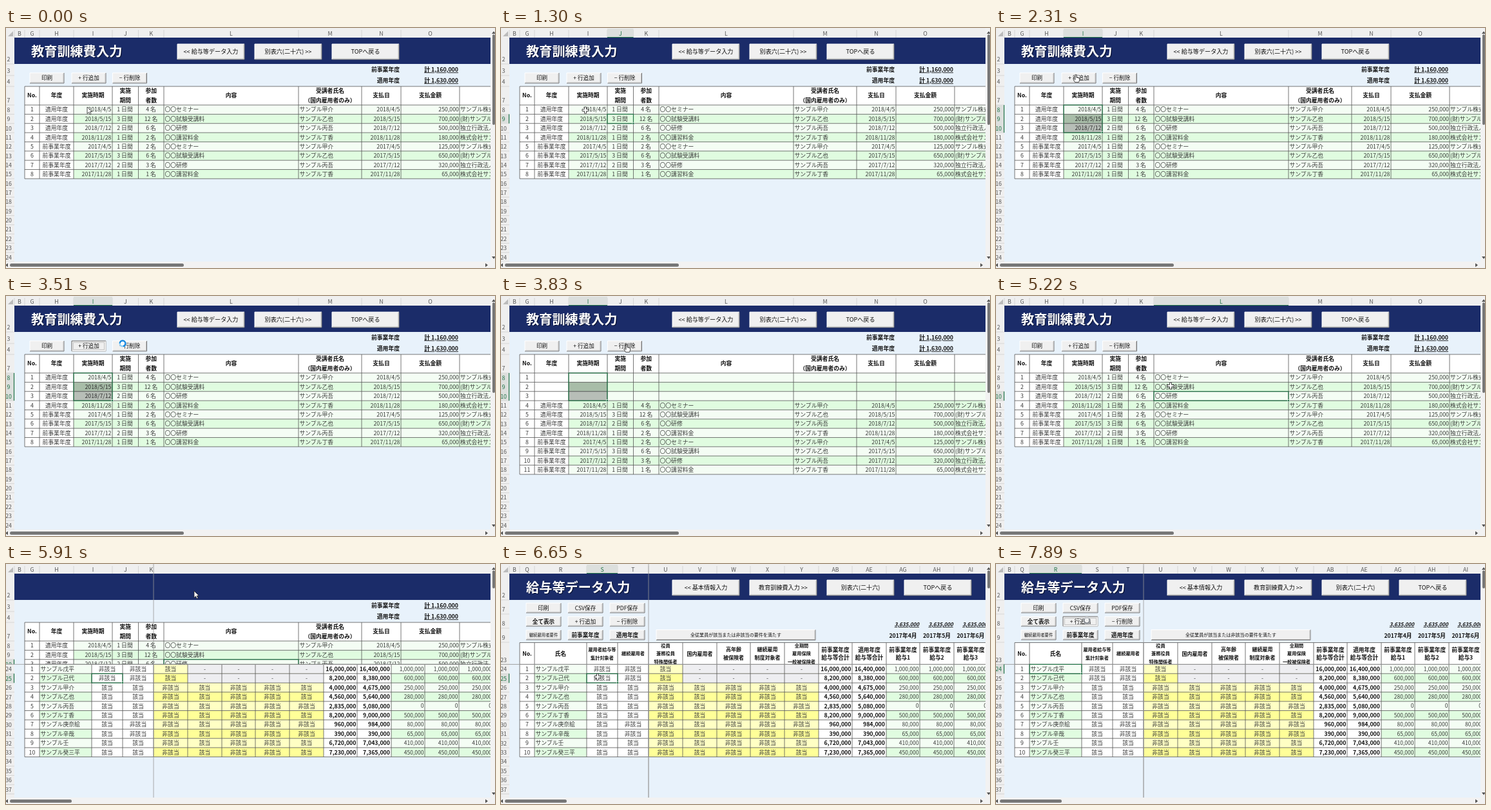
An HTML page for the animation above (8 s loop, 759 by 374 pixels).

```html
<!DOCTYPE html>
<html lang="ja">
<head>
<meta charset="utf-8">
<title>教育訓練費入力</title>
<style>
html, body { margin: 0; width: 100%; height: 100%; overflow: hidden; background: #e8f2fb; }
svg { display: block; width: 759px; height: 374px; font-family: "Noto Sans CJK JP", "Noto Sans CJK", sans-serif; }
text { white-space: pre; }
</style>
</head>
<body>
<svg id="stage" viewBox="0 0 759 374" xmlns="http://www.w3.org/2000/svg"></svg>
<script>
const LOOP = 8000;
const NAVY = '#1b2c69', BG = '#e8f2fb', HEAD = '#efefef', LINE = '#555', GREEN = '#217346';
const MINT = ['#f4fdf4', '#e0fce0'], LEMON = ['#ffffc4', '#ffff98'];

// drawing helpers
const text = (x, y, s, o = {}) => {
  const { size = 8.8, at = 'middle', bold, fill = '#3a3a3a', more = '' } = o;
  return `<text x="${x}" y="${y + size * 0.37}" font-size="${size}" text-anchor="${at}" fill="${fill}" font-weight="${bold ? 700 : 400}" ${more}>${s}</text>`;
};
const rect = (x, y, w, h, fill, more = '') => `<rect x="${x}" y="${y}" width="${w}" height="${h}" fill="${fill}" ${more}/>`;
const path = (d, stroke = LINE, width = 0.8, more = '') => `<path d="${d}" fill="none" stroke="${stroke}" stroke-width="${width}" ${more}/>`;
const group = (s, ...spans) => `<g ${spans.length ? `data-on="${spans.join(' ')}"` : ''}>${s}</g>`;
const left = { at: 'start' }, right = { at: 'end' }, bold = { bold: true, fill: '#111' };
const mid = (cols, i) => (cols[i] + cols[i + 1]) / 2;
const range = (a, b) => Array.from({ length: b - a + 1 }, (_, i) => a + i);

function button(x, y, w, h, label, o = {}) {
  const { size = 8.6, down } = o;
  const lit = down ? '#666' : '#fff', dark = down ? '#ddd' : '#777';
  return rect(x, y, w, h, '#f0f0f0') +
    path(`M${x} ${y + h}V${y}H${x + w}`, lit, 1) +
    path(`M${x} ${y + h}H${x + w}V${y}`, dark, 1) +
    path(`M${x + 1} ${y + h - 1}H${x + w - 1}V${y + 1}`, down ? '#eee' : '#b4b4b4', 0.8) +
    (down ? rect(x + 2.5, y + 2.5, w - 5, h - 5, 'none', 'stroke="#777" stroke-width=".7" stroke-dasharray="1 1"') : '') +
    text(x + w / 2, y + h / 2, label, { size, fill: '#111', bold: o.bold });
}
const title = s => {
  const o = { size: 20.2, at: 'start', bold: true };
  return text(40.3, 37.5, s, { ...o, fill: '#0c1538' }) + text(39, 36.2, s, { ...o, fill: '#fff' });
};
const nav = labels => labels.map((s, i) => button(266 + 120 * i, 25, 104, 24, s, { size: 9.1 })).join('');

// sheet geometry
const colsA = [13, 29, 52, 105, 165, 205.5, 245, 454, 552, 613, 704, 765];
const colsB = [13, 29, 52, 133, 181, 229, 282, 335, 387, 440, 493, 545, 598, 650, 703, 755];
const lettersA = 'B G H I J K L M N O'.split(' ');
const lettersB = 'B Q R S T U V W X Y AB AE AG AH AI'.split(' ');
const rowA = n => 120 + 14.36 * (n - 8);
const rowB = n => 156.4 + 14.42 * (n - 24);
const endA = n => ({ 2: 56, 3: 74, 4: 91, 7: 120 })[n] || rowA(n + 1);
const endB = n => ({ 2: 56, 7: 78, 8: 100, 9: 122, 23: 156.4 })[n] || rowB(n + 1);

const colHead = (cols, letters) => rect(0, 0, 752, 15, HEAD) + '<path d="M11 5V13H3Z" fill="#bbb"/>' +
  letters.map((s, i) => path(`M${cols[i]} 3V15`, '#d0d0d0') + text(mid(cols, i), 8.5, s, { fill: '#555' })).join('');
const rowHead = (rows, end) => rows.map(n => path(`M0 ${end(n)}H13`, '#d0d0d0') +
  text(4, end(n) - 6.8, n, { fill: '#555' })).join('');
const scrollbars = (w, h) => rect(752, 0, 7, 374, '#f2f2f2') + rect(0, 364, 759, 10, '#f2f2f2') +
  rect(755, 10, 4, h, '#777', 'rx="2"') + rect(6, 367, w, 5, '#777', 'rx="2.5"') +
  '<path d="M754 9L757 5 760 9ZM754 356L757 360 760 356ZM3 366.500V372.500L-1 369.500ZM744 366.500V372.500L748 369.500Z" fill="#555"/>';
const grid = (cols, top, y0, n, step) => {
  let d = cols.slice(1).map(x => `M${x} ${top}V${y0 + n * step}`).join('') + `M29 ${top}H752`;
  for (let i = 0; i <= n; i++) d += `M29 ${y0 + i * step}H752`;
  return path(d);
};

// training sheet
const people = ['甲介', '乙也', '丙吾', '丁香'].map(s => 'サンプル' + s);
const lessons = ['セミナー', '試験受講料', '研修', '講習料金'];
const payees = ['サンプル株式会社', '(財)サンプル協会', '独立行政法人見本', '株式会社サンプル'];
const days = ['4/5', '5/15', '7/12', '11/28'], spans = [1, 3, 2, 1];
const heads = [4, 12, 6, 2, 2, 6, 3, 1], fees = [250, 700, 500, 180, 125, 650, 320, 65];

function tableA(n, yearOf, dataOf) {
  let s = rect(29, 120, 76, n * 14.36, '#fff');
  for (let i = 0; i < n; i++) {
    const top = rowA(8 + i), y = top + 7.2, yi = yearOf(i), k = dataOf(i), q = k % 4;
    s += rect(105, top, 650, 14.36, MINT[i % 2]) + text(40.5, y, i + 1);
    if (yi >= 0) s += text(78.5, y, yi < 4 ? '適用年度' : '前事業年度');
    if (k < 0) continue;
    const date = (k < 4 ? 2018 : 2017) + '/' + days[q];
    s += text(163.5, y, date, right) + text(184.5, y, spans[q] + ' 日間') + text(225, y, heads[k] + ' 名') +
      text(246.5, y, '〇〇' + lessons[q], left) + text(455.5, y, people[q], left) +
      text(611.5, y, date, right) + text(703, y, fees[k] + ',000', right) + text(705, y, payees[q], left);
  }
  return s + grid(colsA, 91, 120, n, 14.36);
}

const headA = [['No.'], ['年度'], ['実施時期'], ['実施', '期間'], ['参加', '者数'], ['内容'],
  ['受講者氏名', '（国内雇用者のみ）'], ['支払日'], ['支払金額']];
const header = (cols, list, y, gap, sizes) => list.map((lines, i) => lines.map((s, j) =>
  text(mid(cols, i + 1), y + (j - (lines.length - 1) / 2) * gap, s, { ...bold, size: sizes ? sizes(i) : 8.8 })).join('')).join('');
const total = (y, name, sum) => text(611, y, name, { ...bold, ...right }) +
  text(702, y, '計 ' + sum, { ...bold, ...right, more: 'text-decoration="underline"' });
const shift = i => i < 3 ? -1 : i - 3;
const same = i => i;

const add = down => button(102, 70, 53, 16, '+ 行追加', { down });
const del = down => button(165.5, 70, 53, 16, '− 行削除', { down });

// selection with highlighted headings
function select(cols, letters, rowTop, c, r0, r1, a, b, colFrom = a) {
  const x = cols[c], w = cols[c + 1] - x, y = rowTop(r0), h = rowTop(r1 + 1) - y;
  const col = rect(x, 1, w, 14, '#dcdfdd') + path(`M${x} 14.500H${x + w}`, GREEN, 1.2) + text(x + w / 2, 8.5, letters[c], { fill: GREEN });
  let s = rect(0, y, 13, h, '#dcdfdd') + path(`M12.500 ${y}V${y + h}`, GREEN, 1.2);
  for (const n of range(r0, r1)) s += text(4, rowTop(n + 1) - 6.8, n, { fill: GREEN });
  if (r1 > r0) s += rect(x, rowTop(r0 + 1), w, rowTop(r1 + 1) - rowTop(r0 + 1), '#000', 'opacity=".25"');
  s += rect(x, y, w, h, 'none', `stroke="${GREEN}" stroke-width="1.2"`) +
    rect(x + w - 1.5, y + h - 1.5, 3, 3, GREEN, 'stroke="#fff" stroke-width=".6"');
  return group(col, colFrom, b) + group(s, a, b);
}
const selA = (...a) => select(colsA, lettersA, rowA, ...a);
const selB = (...a) => select(colsB, lettersB, rowB, ...a);

const sheetA = rect(0, 0, 759, 374, BG) + rect(13, 15, 739, 41, NAVY) + rect(0, 0, 13, 374, HEAD) +
  colHead(colsA, lettersA) + rowHead([2, 3, 4, ...range(7, 24)], endA) +
  total(65, '前事業年度', '1,160,000') + total(82, '適用年度', '1,630,000') +
  rect(29, 91, 723, 29, '#fff') + header(colsA, headA, 105, 14.5) +
  group(tableA(8, same, same), 0, 3640, 4560, LOOP) +
  group(tableA(11, shift, shift), 3640, 4440) +
  group(tableA(11, shift, i => i < 8 ? i : i - 3), 4440, 4560) +
  selA(4, 9, 9, 560, 1640) + selA(3, 8, 8, 1640, 1760) + selA(3, 8, 9, 1760, 1850) +
  selA(3, 8, 10, 1850, 5090) + selA(6, 10, 10, 5090, 5980) + scrollbars(270, 141) +
  group(title('教育訓練費入力') + nav(['&lt;&lt; 給与等データ入力', '別表六(二十六) &gt;&gt;', 'TOPへ戻る']) +
    button(37, 70, 53, 16, '印刷') + add() + del() +
    group(add(true), 3000, 3640) + group(del(true), 4160, 4400), 0, 5780);

// payroll sheet
const staff = [
  ['戊平', '非非該----', '16,000', '16,400', '1,000'], ['己代', '非非該----', '8,200', '8,380', '600'],
  ['甲介', '該該非該非非該', '4,000', '4,675', '250'], ['乙也', '該該非該非非該', '4,560', '5,640', '280'],
  ['丙吾', '該該非該非非非', '2,835', '5,080', ''], ['丁香', '該該非該非非該', '8,200', '9,000', '500'],
  ['庚奈絵', '該非非該非非非', '960', '984', '80'], ['辛哉', '該非非該非非非', '390', '390', '65'],
  ['壬', '該該非該非非該', '6,720', '7,043', '410'], ['癸三平', '該該非該非非該', '7,230', '7,365', '450']];
const words = { 非: '非該当', 該: '該当', '-': '-' };

function tableB() {
  let s = rect(29, 156.4, 723, 144.2, '#fff');
  staff.forEach(([name, flags, last, now, pay], i) => {
    const top = rowB(24 + i), y = top + 7.2, fill = (a, b, c) => rect(colsB[a], top, colsB[b] - colsB[a], 14.42, c);
    s += fill(2, 3, MINT[i % 2]) + fill(5, 10, LEMON[i % 2]) + fill(12, 15, MINT[i % 2]);
    if (i < 2) s += fill(6, 10, '#eeeef1');
    s += text(40.5, y, i + 1) + text(53.5, y, 'サンプル' + name, left);
    [...flags].forEach((f, j) => { s += text(mid(colsB, j + 3), y, words[f]); });
    s += text(543.5, y, last + ',000', { ...bold, ...right }) + text(596, y, now + ',000', { ...bold, ...right });
    for (const x of [648.5, 701.5, 754]) s += text(x, y, pay ? pay + ',000' : '0', { ...right, size: 8.5 });
  });
  return s + grid(colsB, 156.4, 156.4, 10, 14.42);
}

const headB = [['No.'], ['氏名'], ['雇用者給与等', '集計対象者'], ['継続雇用者'], ['役員', '兼務役員', '特殊関係者'], ['国内雇用者'],
  ['高年齢', '被保険者'], ['継続雇用', '制度対象者'], ['全期間', '雇用保険', '一般被保険者'],
  ['前事業年度', '給与等合計'], ['適用年度', '給与等合計'], ...[1, 2, 3].map(n => ['前事業年度', '給与' + n])];
const sizeB = i => i < 2 || i > 8 ? 8.7 : i < 5 || i === 8 ? 7.2 : 8;
const toolsB = [['印刷', 'CSV保存', 'PDF保存'], ['全て表示', '+ 行追加', '− 行削除'], ['継続雇用者要件', '前事業年度', '適用年度']];
const strong = ['全て表示', '前事業年度', '適用年度'];
const toolB = (r, c, down) => {
  const s = toolsB[r][c];
  return button(39 + 65 * c, 61 + 21 * r, 54, 15, s, { down, bold: strong.includes(s), size: s.length > 6 ? 6.4 : 8.6 });
};

const lowerB = rect(0, 156.4, 752, 208, BG) + rect(0, 156.4, 13, 208, HEAD) + rowHead(range(24, 37), endB) +
  tableB() + rect(229, 0, 523, 15, HEAD) + path('M229 0V364M0 156.400H752', '#999') + scrollbars(96, 28);

const upperB = rect(0, 0, 752, 156.4, BG) + rect(13, 15, 739, 41, NAVY) + rect(0, 0, 13, 156.4, HEAD) +
  colHead(colsB, lettersB) + rowHead([2, 7, 8, 9, 23], endB) + title('給与等データ入力') +
  nav(['&lt;&lt; 基本情報入力', '教育訓練費入力 &gt;&gt;', '別表六(二十六)', 'TOPへ戻る']) +
  toolsB.map((row, r) => row.map((_, c) => toolB(r, c)).join('')).join('') + group(toolB(1, 1, true), 7700, LOOP) +
  button(241, 102.5, 247, 16, '全従業員が該当または非該当の要件を満たす', { size: 7.05 }) +
  [4, 5, 6].map((m, i) => text(649 + 52.7 * i, 94, '3,635,000', { ...bold, ...right, size: 8, more: 'font-style="italic" text-decoration="underline"' }) +
    text(mid(colsB, 12 + i), 112, `2017年${m}月`, { ...bold, size: 8.7 })).join('') +
  rect(29, 122.5, 723, 34, '#fff') + header(colsB, headB, 139.8, 12.6, sizeB) +
  path(colsB.slice(1).map(x => `M${x} 122.500V156.400`).join('') + 'M29 122.500H752M29 156.400H752') +
  path('M229 0V364M0 156.400H752', '#999') + rect(752, 0, 7, 374, '#f2f2f2') + scrollbars(96, 28);

// pointer shapes, hot spot at the origin
const ring = (a, b) => `<circle r="5.800" fill="#fff" opacity=".85"/><circle r="4.400" fill="none" stroke="${b}" stroke-width="2.200"/>` +
  `<circle class="spin" r="4.400" fill="none" stroke="${a}" stroke-width="2.200" stroke-dasharray="19 9"/>`;
const inked = d => path(d, '#222', 0.8, 'style="fill:#fff" stroke-linejoin="round"');
const pointers = {
  arrow: inked('M0 0V10.500L2.500 8.200 4.200 12 6 11.200 4.300 7.500H7.500Z'),
  cross: inked('M-1.500 -5H1.500V-1.500H5V1.500H1.500V5H-1.500V1.500H-5V-1.500H-1.500Z'),
  hand: inked('M-1 0Q0 -1 1 0V4L5 5Q6 5.500 5.700 8L4.500 11.500H-1.500L-4 7Q-4 5.500 -2.500 6.300L-1 7.500Z'),
  ring: ring('#1788e0', '#8fd0f7'),
  dim: ring('#8c9096', '#c6c9cc')
};

document.getElementById('stage').innerHTML = sheetA + group(lowerB, 5840, LOOP) + group(upperB, 5980, LOOP) +
  selB(3, 25, 25, 5840, 6860, 5980) + selB(2, 24, 24, 6860, LOOP) +
  '<g id="pointer">' + Object.entries(pointers).map(([k, s]) => `<g data-kind="${k}">${s}</g>`).join('') + '</g>';

// time, x, y, shape
const track = [
  [0, 126, 123, 'arrow'], [330, 126, 123, 'cross'], [560, 184, 141, 'cross'], [650, 184, 141, 'cross'],
  [850, 116, 129, 'cross'], [1000, 116, 129, 'cross'], [1300, 131, 128, 'cross'], [1570, 131, 128, 'cross'],
  [1640, 135, 128, 'cross'], [1900, 135, 156, 'cross'], [1980, 135, 156, 'cross'], [2310, 124, 73, 'hand'],
  [2380, 124, 73, 'hand'], [2800, 129, 74, 'hand'], [3210, 129, 74, 'ring'], [3510, 181, 74, 'ring'],
  [3700, 193, 75, 'hand'], [3830, 195, 76, 'hand'], [4600, 195, 76, 'hand'], [4660, 205, 90, 'cross'],
  [4890, 270, 155, 'cross'], [5090, 270, 155, 'cross'], [5220, 271, 140, 'cross'], [5560, 292, 52, 'hand'],
  [5640, 292, 42, 'hand'], [5780, 292, 42, 'arrow'], [6050, 292, 42, 'cross'], [6650, 150, 176, 'cross'],
  [6720, 150, 176, 'cross'], [6860, 104, 164, 'cross'], [7050, 104, 164, 'cross'], [7470, 128, 86, 'hand'],
  [7540, 128, 86, 'hand'], [7760, 141, 88, 'dim'], [LOOP, 141, 88, 'dim']];

const timed = [...document.querySelectorAll('[data-on]')].map(el => [el, el.dataset.on.split(' ').map(Number)]);
const pointer = document.getElementById('pointer');
const shapes = [...pointer.children], spinners = [...document.querySelectorAll('.spin')];
const show = (el, on) => { el.style.display = on ? '' : 'none'; };

function draw(t) {
  for (const [el, edges] of timed) show(el, edges.filter(e => e <= t).length % 2);
  const i = track.findIndex(k => k[0] > t);
  const [t0, x0, y0, kind] = track[i - 1], [t1, x1, y1] = track[i];
  const u = (t - t0) / (t1 - t0), e = u * u * (3 - 2 * u);
  pointer.setAttribute('transform', `translate(${x0 + (x1 - x0) * e} ${y0 + (y1 - y0) * e})`);
  for (const el of shapes) show(el, el.dataset.kind === kind);
  for (const el of spinners) el.setAttribute('transform', `rotate(${t * 0.36})`);
}

const start = performance.now();
function tick() {
  draw((performance.now() - start) % LOOP);
  requestAnimationFrame(tick);
}
tick();
</script>
</body>
</html>
```
